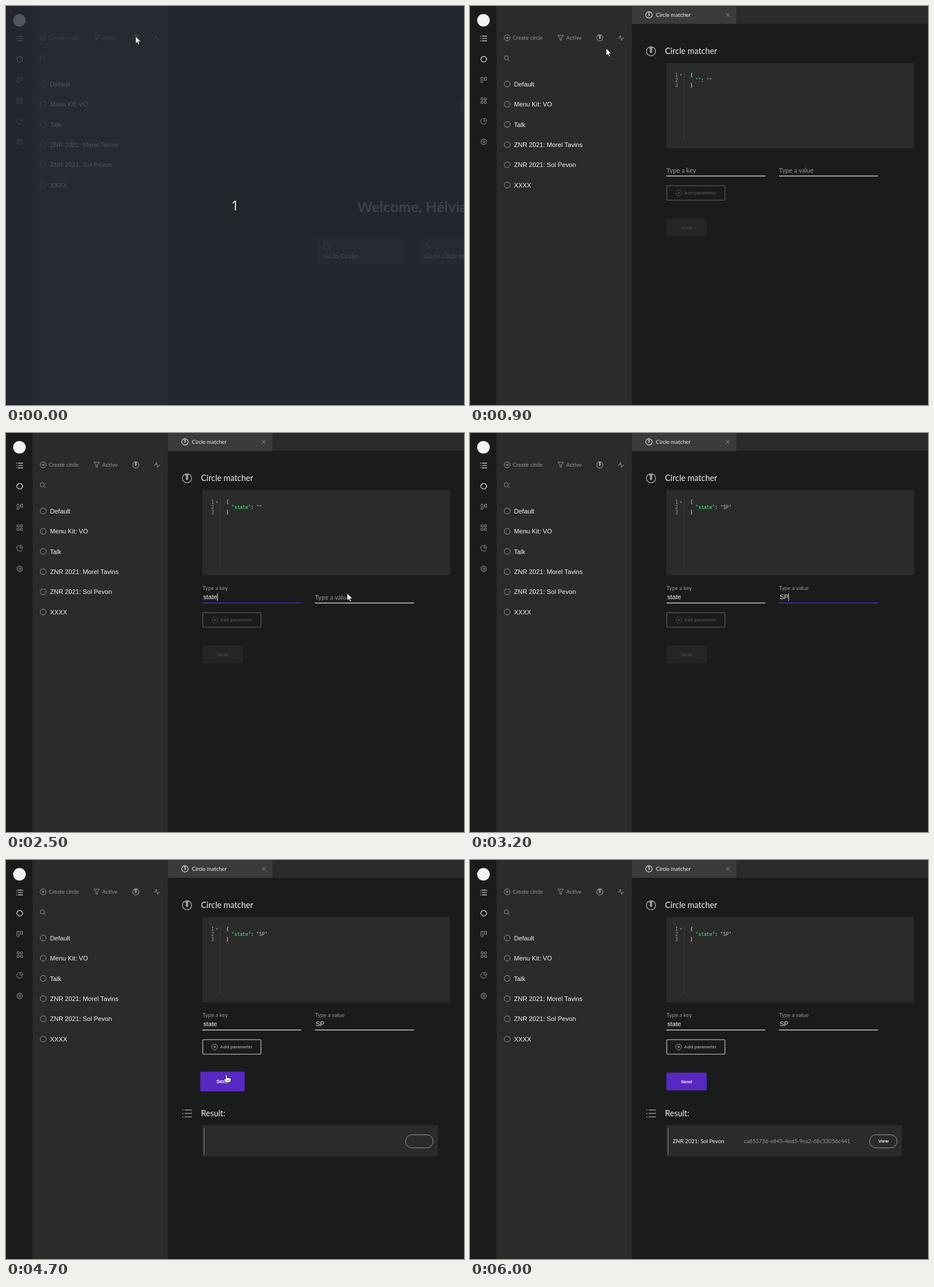
Animation of 801x699 px, one loop 6.4 s. Source, as an HTML page:

```html
<!DOCTYPE html>
<html lang="en">
<head>
<meta charset="utf-8">
<title>Circle matcher</title>
<style>
  html, body { margin: 0; width: 100%; height: 100%; overflow: hidden; background: #1a1c1b; }
  svg { display: block; }
  text { font-family: Lato, sans-serif; font-size: 9.6px; fill: #979998; white-space: pre; }
  .arial { font-family: "Liberation Sans", Arial, sans-serif; font-size: 11.2px; fill: #f2f2f2; }
  .button { font-family: "Liberation Sans", Arial, sans-serif; font-size: 8px; font-weight: bold; text-anchor: middle; }
  .code { font-family: "DejaVu Sans Mono", monospace; font-size: 8px; fill: #f5f5f0; }
  .number { fill: #a5a7a6; }
  .heading { font-size: 14.4px; fill: #eeefee; }
  .card { font-size: 11.2px; font-weight: bold; }
  .white { fill: #f2f2f2; }
  .panel { fill: #2a2c2b; }
  .icon { fill: none; stroke: #979998; }
  .bright { stroke: #e8e8e8; }
  .solid { fill: #979998; stroke: none; }
  .bright .solid { fill: #e8e8e8; }
</style>
</head>
<body>
<svg width="801" height="699" viewBox="0 0 801 699">
  <defs>
    <g id="plus"><circle r="5.2"/><path d="M-2.6 0H2.6M0-2.6V2.6"/></g>
    <path id="pulse" d="M-5.3 .3H-3L-1.2-4.6L1.4 4.6L3.2 .3H5.3"/>
    <path id="list" d="M-4.5-6H8.5M-4.5 0H8.5M-4.5 6H8.5M-8.5-6H-6.5M-8.5 0H-6.5M-8.5 6H-6.5"/>
    <g id="matcher">
      <circle r="8" stroke-width="1.6"/>
      <path class="solid" d="M-3.6-8H3.6L1.7-1.5A2.5 2.5 0 1 1-1.7-1.5Z"/>
    </g>
    <path id="arrow" d="M0 0V13.2L3.1 10.4L5.2 15.2L7.4 14.2L5.3 9.6H9.6Z" fill="#fff" stroke="#111" stroke-width=".9"/>
    <g id="hand" stroke="#111" stroke-width=".9">
      <path d="M-2 7.4V1.2A1.3 1.3 0 0 1 .7 1.2V4.8L3.2 5L5.6 5.4L7.6 6.4V9.6L6.6 13H-1.2L-5 8.4Q-5.2 6.2-2 7.4Z" fill="#fff"/>
      <path d="M1 8.5V11M3.1 8.5V11M5.2 8.5V11" stroke-width=".6"/>
    </g>
    <path id="beam" d="M-2.5-6H-.6L0-5.5L.6-6H2.5M0-5.5V5.5M-2.5 6H-.6L0 5.5L.6 6H2.5" fill="none" stroke="#f2f2f2" stroke-width="1.1"/>
  </defs>

  <rect width="801" height="699" fill="#1a1c1b"/>

  <!-- navigation -->
  <circle cx="23.5" cy="25" r="11" fill="#f2f2f2"/>
  <g class="icon">
    <use href="#list" class="bright" transform="translate(24 57) scale(.68)" stroke-width="1.8"/>
    <circle class="bright" cx="24" cy="93.2" r="4.9" stroke-width="1.2"/>
    <path d="M19.3 124.8H22.7V133.8H19.3ZM25.5 124.8H28.9V130.3H25.5Z"/>
    <path d="M19.3 161H22.8V164.5H19.3ZM25.2 161H28.7V164.5H25.2ZM19.3 167H22.8V170.5H19.3ZM25.2 167H28.7V170.5H25.2Z"/>
    <path d="M22.6 197.2A5 5 0 1 0 28.6 203.4M24.6 196.7A5 5 0 0 1 29.2 201.4H24.6Z"/>
    <path d="M22.8 233H25.2L25.8 234.6L27.6 234.2L28.8 236.2L27.8 238L28.8 239.8L27.6 241.8L25.8 241.4L25.2 243H22.8L22.2 241.4L20.4 241.8L19.2 239.8L20.2 238L19.2 236.2L20.4 234.2L22.2 234.6Z"/>
    <circle cx="24" cy="238" r="1.7"/>
  </g>

  <!-- circle list -->
  <rect class="panel" x="46.5" width="236.3" height="699"/>
  <g class="icon">
    <use href="#plus" x="65" y="55.8"/>
    <path d="M153.6 51.1H163.6L159.8 55.8V60.5L157.3 59V55.8Z"/>
    <use href="#matcher" transform="translate(227 55.8) scale(.68)"/>
    <use href="#pulse" x="264" y="56"/>
    <path d="M66.2 93.5L69 96.3"/><circle cx="63.5" cy="90.8" r="3.7"/>
  </g>
  <text x="74.7" y="59.2">Create circle</text>
  <text x="168.3" y="59.2">Active</text>
  <g id="circles"></g>

  <!-- welcome page -->
  <g data-on="0 800">
    <rect class="panel" x="794" y="163" width="10" height="22" rx="2"/>
    <path d="M798 170H801M798 178H801" stroke="#444645"/>
    <text x="614.3" y="361.2" style="font-size:25.6px;font-weight:bold">Welcome, Hélvia</text>
    <rect class="panel" x="543" y="407" width="157" height="47" rx="3"/>
    <rect class="panel" x="720" y="407" width="157" height="47" rx="3"/>
    <g class="icon"><circle cx="560.5" cy="420.8" r="5.2"/><use href="#pulse" x="737.5" y="420.8"/></g>
    <text class="card" x="554.4" y="442.2">Go to Circles</text>
    <text class="card" x="731.6" y="442.2">Go to Circle History</text>
  </g>

  <!-- matcher page -->
  <g data-on="800 6400">
    <rect class="panel" x="283" width="518" height="31.3"/>
    <rect x="283" width="183" height="31.3" fill="#3a3c3b"/>
    <use href="#matcher" class="icon bright" transform="translate(313 15.5) scale(.7)"/>
    <text class="white" x="325" y="19">Circle matcher</text>
    <path class="icon" d="M448 12.5L454 18.5M454 12.5L448 18.5"/>
    <use href="#matcher" class="icon" x="316.5" y="79.3"/>
    <text class="heading" x="341" y="83.6">Circle matcher</text>

    <rect class="panel" x="343.3" y="100" width="433.2" height="149.3" rx="2"/>
    <path d="M374.5 115V234" stroke="#40423f"/>
    <path class="solid" d="M367 119.8H371L369 122.3Z"/>
    <text class="code number" x="359" y="123.6">1</text>
    <text class="code number" x="359" y="133">2</text>
    <text class="code number" x="359" y="142.4">3</text>
    <text class="code" x="385" y="123.6">{</text>
    <text class="code" x="394.6" y="133"><tspan id="jsonKey" fill="#50fa7b"></tspan>: <tspan id="jsonValue" fill="#bfc1bd"></tspan></text>
    <text class="code" x="385" y="142.4">}</text>

    <text id="keyLabel" x="343.5">Type a key</text>
    <text id="valueLabel" x="540.3">Type a value</text>
    <text id="keyText" class="arial" x="345" y="291.2"></text>
    <text id="valueText" class="arial" x="541.8" y="291.2"></text>
    <rect id="keyLine" x="343.5" y="297.2" width="173" height="1.2"/>
    <rect id="valueLine" x="540.5" y="297.2" width="173" height="1.2"/>
    <rect id="caret" y="281" width="1" height="13" fill="#f2f2f2"/>

    <g id="add">
      <rect class="icon" x="344.2" y="314.8" width="101.6" height="25.4" rx="2" stroke-width="1.6"/>
      <use href="#plus" class="icon" x="365" y="327.5"/>
      <text class="button" x="402.8" y="330.2">Add parameter</text>
    </g>
    <g id="send">
      <rect x="-35.3" y="-15.6" width="70.6" height="31.2" rx="2"/>
      <text class="button" y="2.6">Send</text>
    </g>

    <g data-on="4600 6400">
      <use href="#list" class="icon" x="316.7" y="444" stroke-width="1.6"/>
      <text class="heading" x="341" y="449.4">Result:</text>
      <rect class="panel" x="343.3" y="464.3" width="412" height="55.3"/>
      <path d="M346.5 469V517" stroke="#858786"/>
      <rect class="icon" x="698.8" y="481.3" width="48.2" height="23" rx="11.5"/>
      <g id="match">
        <text class="white" x="354.5" y="496">ZNR 2021: Sol Pevon</text>
        <text x="479" y="496">ca853736-e845-4ed5-9ea2-68c33056c441</text>
        <text class="button white" x="723.2" y="495.3">View</text>
      </g>
    </g>
  </g>

  <!-- countdown -->
  <g data-on="0 200">
    <rect width="801" height="699" fill="#272933" opacity=".78"/>
    <text x="400.6" y="358" text-anchor="middle" style="font:24px 'Noto Sans',sans-serif;fill:#e9e9da">1</text>
  </g>

  <use id="pointer"/>
</svg>
<script>
  const LOOP = 6400, STEP = 100;
  const $ = id => document.getElementById(id);

  // Each track lists [start, ...values]; an entry holds until the next one.
  const pointerTrack = [
    [0, 'arrow', 226.5, 53], [200, 'hand', 227.3, 53.3],
    [900, 'arrow', 238, 74], [1000, 'arrow', 274, 128], [1100, 'arrow', 320, 190],
    [1200, 'arrow', 360, 246], [1300, 'beam', 386, 281], [1400, 'beam', 391.3, 287],
    [1600, ''], [2300, 'beam', 410, 287], [2400, 'arrow', 520, 283],
    [2500, 'arrow', 596.5, 280.5], [2600, 'beam', 597, 287], [2800, ''],
    [3800, 'arrow', 600, 279], [3900, 'arrow', 505, 332], [4000, 'arrow', 396, 384],
    [4200, 'hand', 386, 376.5],
    [5300, 'arrow', 355, 330], [5400, 'arrow', 290, 240], [5500, 'arrow', 215, 150],
    [5600, 'arrow', 160, 88], [5700, 'arrow', 132, 58], [5900, 'arrow', 65.5, 11.5], [6000, '']
  ];
  const keyTrack = [[0, ''], [1700, 's'], [1900, 'st'], [2200, 'sta'], [2300, 'stat'], [2400, 'state']];
  const valueTrack = [[0, ''], [3000, 'S'], [3200, 'SP']];
  const keyFloat = [[0, 0], [1600, .5], [1700, 1]];
  const valueFloat = [[0, 0], [2700, .5], [2800, .9], [2900, 1]];
  const focusTrack = [[0, ''], [1500, 'key'], [2600, 'value'], [4500, '']];
  const sendScale = [[0, 1], [4200, 1.03], [4300, 1.063], [4400, 1.1], [5300, 1.06], [5400, 1.02], [5500, 1]];
  const matchFade = [[0, 0], [4900, .35], [5000, .7], [5100, 1]];

  const at = (track, t) => track.findLast(entry => entry[0] <= t).slice(1);

  $('circles').innerHTML = ['Default', 'Menu Kit: VO', 'Talk', 'ZNR 2021: Morel Tavins', 'ZNR 2021: Sol Pevon', 'XXXX']
    .map((name, i) => {
      const y = 136.7 + i * 35.4;
      return `<circle class="icon" cx="65" cy="${y}" r="5.1"/><text class="arial" x="77" y="${y + 4}">${name}</text>`;
    }).join('');

  const timed = [...document.querySelectorAll('[data-on]')].map(el => [el, ...el.dataset.on.split(' ').map(Number)]);

  function drawField(name, json, text, float, focused) {
    $(name + 'Text').textContent = text;
    $(json).textContent = `"${text}"`;
    const label = $(name + 'Label');
    label.setAttribute('y', 292 - 17.2 * float);
    label.style.fontSize = 11.2 - 1.6 * float + 'px';
    $(name + 'Line').setAttribute('fill', focused ? '#5130d2' : '#f2f2f2');
  }

  function draw(t) {
    for (const [el, from, to] of timed) el.style.display = t >= from && t < to ? '' : 'none';

    const [focus] = at(focusTrack, t);
    drawField('key', 'jsonKey', at(keyTrack, t)[0], at(keyFloat, t)[0], focus === 'key');
    drawField('value', 'jsonValue', at(valueTrack, t)[0], at(valueFloat, t)[0], focus === 'value');

    $('caret').style.display = focus && t < 3800 ? '' : 'none';
    if (focus) {
      const field = $(focus + 'Text');
      const width = field.textContent ? field.getComputedTextLength() : 0;
      $('caret').setAttribute('x', +field.getAttribute('x') + width);
    }

    const ready = t >= 3400;
    const [box, label] = $('send').children;
    $('add').style.opacity = ready ? 1 : .4;
    box.setAttribute('fill', ready ? '#5828c2' : '#242625');
    label.style.fill = ready ? '#fff' : '#474948';
    $('send').setAttribute('transform', `translate(378.7 388) scale(${at(sendScale, t)[0]})`);
    $('match').style.opacity = at(matchFade, t)[0];

    const [shape, x, y] = at(pointerTrack, t);
    $('pointer').style.display = shape ? '' : 'none';
    if (shape) {
      $('pointer').setAttribute('href', '#' + shape);
      $('pointer').setAttribute('transform', `translate(${x} ${y})`);
    }
  }

  const start = performance.now();
  let last = -1;
  function tick() {
    const t = Math.floor((performance.now() - start) % LOOP / STEP) * STEP;
    if (t !== last) draw(last = t);
    requestAnimationFrame(tick);
  }
  tick();
</script>
</body>
</html>
```
